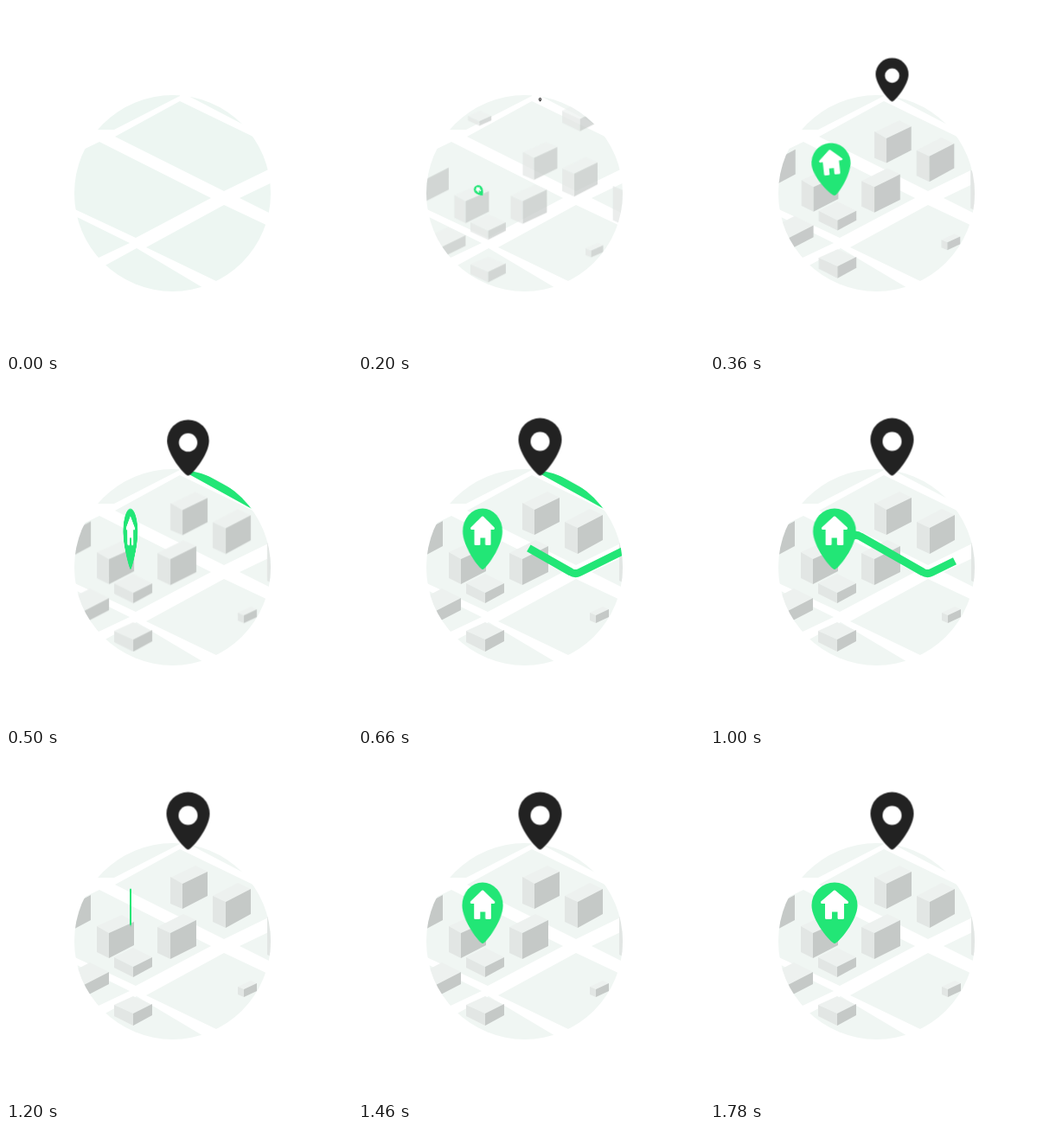
An HTML page without scripts that plays this animation: 400x400 px, repeating every 1800 ms.

```html
<!DOCTYPE html>
<html lang="en">
<head>
<meta charset="utf-8">
<title>Route home</title>
<style>
  html, body { margin: 0; width: 100%; height: 100%; overflow: hidden; background: #fff; }
  .stage { position: absolute; left: 0; top: 0; width: 400px; height: 400px; overflow: hidden; }
  .stage > svg { display: block; }

  .land, .town, .route, .drop, .pop, .spin { animation: 1800ms linear infinite; }

  .land { animation-name: land; }
  .town { animation-name: rise; transform-origin: 196px 360px; }
  .route {
    animation-name: travel;
    fill: none; stroke: #22e676; stroke-width: 9; stroke-linejoin: round;
    stroke-dasharray: 100 200;
  }
  .drop { animation-name: drop; }

  /* zero-size anchor at the tip of the home pin */
  .pop { position: absolute; left: 143.5px; top: 219px; width: 0; height: 0; animation-name: pop; }
  .spin {
    position: absolute; left: -30px; top: -74px; width: 60px; height: 76px;
    overflow: visible; animation-name: spin;
  }

  @keyframes land {
    0%, 6.2% { fill: #edf6f2; }
    8%, 100% { fill: #f0f6f3; }
  }
  @keyframes rise {
    0%, 6.1% { opacity: 0; transform: scale(.77, .6); animation-timing-function: cubic-bezier(.16, 1, .3, 1); }
    35.6%, 100% { opacity: 1; transform: none; }
  }
  @keyframes drop {
    0%, 10.6% { transform: scale(0); animation-timing-function: cubic-bezier(.333, 1, .667, 1); }
    35.6%, 100% { transform: scale(1); }
  }
  @keyframes pop {
    0%, 9.7% { transform: rotate(-45deg) scale(0); animation-timing-function: cubic-bezier(.333, 1, .667, 1); }
    31.1%, 100% { transform: rotate(0deg) scale(1); }
  }
  @keyframes spin {
    0%, 19.4% { transform: rotateY(540deg); animation-timing-function: cubic-bezier(.333, .667, .667, 1); }
    98.9%, 100% { transform: rotateY(0deg); }
  }
  @keyframes travel {
    0%, 20% { stroke-dashoffset: 100; animation-timing-function: cubic-bezier(.455, .03, .515, .955); }
    43.3% { stroke-dashoffset: 0; animation-timing-function: cubic-bezier(.455, .03, .515, .955); }
    66%, 100% { stroke-dashoffset: -100; }
  }
</style>
</head>
<body>
<div class="stage">
  <svg width="400" height="400" viewBox="0 0 400 400">
    <defs>
      <clipPath id="disc"><circle cx="192.5" cy="216.5" r="113.5"/></clipPath>
      <path id="pin" d="M0 0C-4 0-25-25-25-41.5A25 25 0 0 1 25-41.5C25-25 4 0 0 0z"/>
    </defs>

    <g clip-path="url(#disc)">
      <!-- blocks between the roads -->
      <path class="land" d="
        M70 143H125L201 104V90H70z
        M209 103L280 140V90H209z
        M126 151L201 110L296 156L320 181L252 214z
        M60 180L108 157L237 222L150 268L60 226z
        M270 222L320 198V247z
        M162 279L252 230L320 262V340L270 331z
        M60 233L143 274L90 299H60z
        M151 280L240 333V350H60V330z"/>

      <g class="town">
        <path fill="#edf1ef" d="
          M204 150l-14-7 29-14 14 7z
          M254 171l-15-7 29-15 15 7z
          M190 207l-15-7 30-15 15 7z
          M119 207l-14-8 29-13 14 8z
          M147 246l-22-11 22-11 22 11z
          M147 300l-22-10 22-10 22 10z
          M90 267l-22-11 29-15 22 11z
          M275 272l-7-3 15-7 7 3z
          M261 99l-22-11 21-11 22 11z
          M136 102l-14-7 15-7 14 7z"/>
        <path fill="#e2e6e4" d="
          M204 150l-14-8v31l14 6z
          M254 171l-15-7v30l15 7z
          M190 207l-15-7v30l15 7z
          M119 207l-14-8v30l14 7z
          M147 246l-22-11v12l22 11z
          M147 300l-22-10v13l22 11z
          M90 267l-22-11v14l22 11z
          M275 272l-7-3v9l7 3z
          M261 99l-22-11v16l22 11z
          M136 102l-14-7v6l14 7z
          M302 187l18 8v46l-18-9z"/>
        <path fill="#c5c9c7" d="
          M204 150l29-14v28l-29 15z
          M254 171l29-15v29l-29 16z
          M190 207l30-15v30l-30 15z
          M119 207l29-13v27l-29 15z
          M70 178l28-15v29l-28 15z
          M147 246l22-11v11l-22 12z
          M147 300l22-11v13l-22 12z
          M90 267l29-15v14l-29 15z
          M275 272l15-7v9l-15 7z
          M261 99l21-11v16l-21 11z
          M136 102l15-7v6l-15 7z"/>
      </g>

      <path class="route" pathLength="100" d="M212 104L346 178L256 222.5Q251 225 246 222L174 181Q169 178 164 180.500L145 190"/>
    </g>

    <g transform="translate(210.5 110.5)">
      <g class="drop">
        <use href="#pin" fill="#222"/>
        <circle cy="-39.5" r="11" fill="#fff"/>
      </g>
    </g>
  </svg>

  <div class="pop">
    <svg class="spin" viewBox="-30 -74 60 76">
      <use href="#pin" fill="#22e676" transform="scale(1.06)"/>
      <path fill="#fff" stroke="#fff" stroke-width="3" stroke-linejoin="round"
        d="M0-60L14.500-47.500H9.500V-29.500H5V-38H-4.500V-29.500H-9.500V-47.500H-14.500z"/>
    </svg>
  </div>
</div>
</body>
</html>
```
